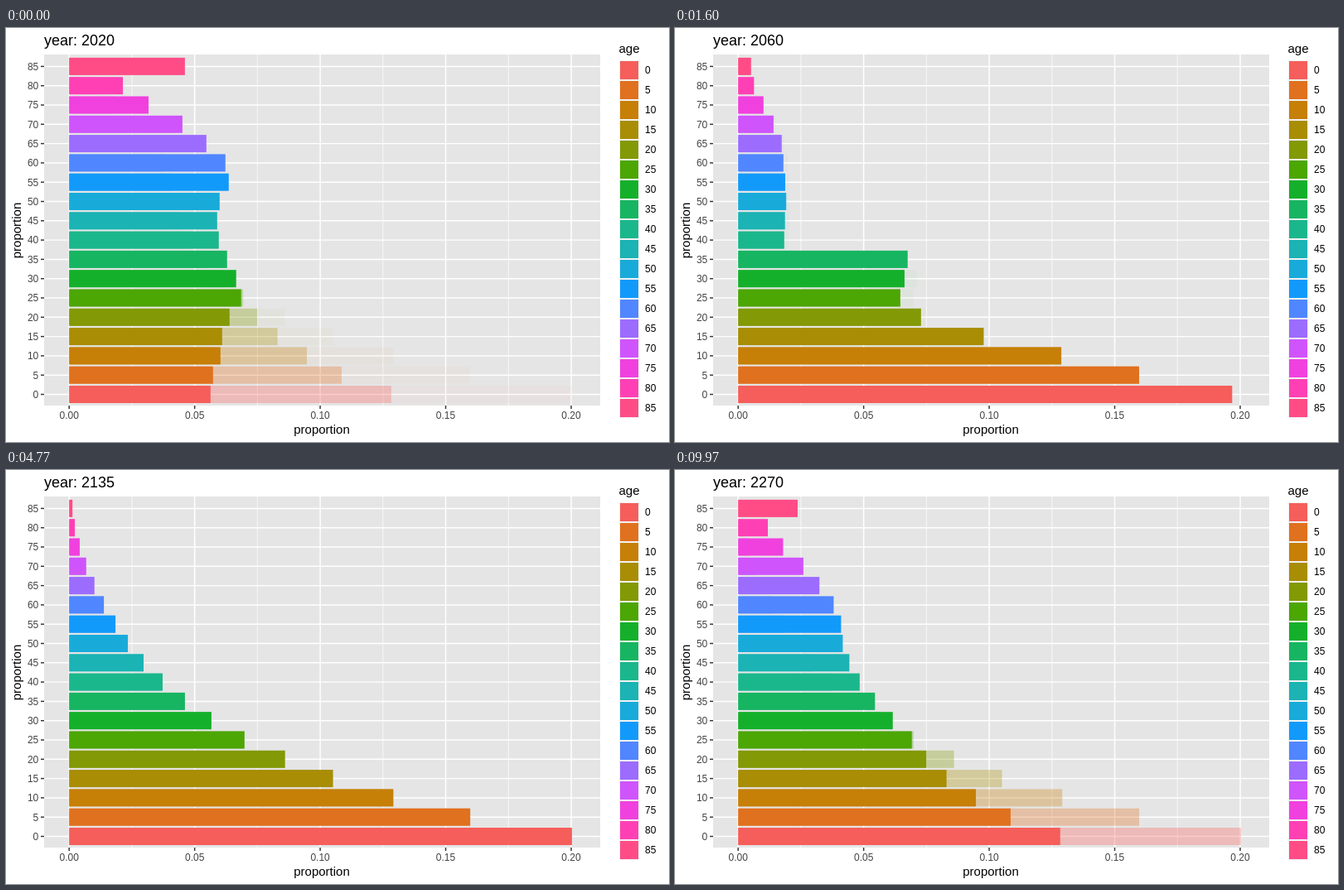
An HTML page for the animation above (10 s loop, 800 px wide and 500 px high).

```html
<!DOCTYPE html>
<html lang="en">
<head>
<meta charset="utf-8">
<title>Population by age</title>
<style>
  html, body { margin: 0; width: 100%; height: 100%; overflow: hidden; background: #fff; }
  svg { display: block; width: 800px; height: 500px; }
  text { font-family: "Liberation Sans", Arial, sans-serif; }
</style>
</head>
<body>
<svg id="stage" viewBox="0 0 800 500" width="800" height="500"></svg>
<script>
const FPS = 30, FRAMES = 300, LOOP = 10000, LAST_STATE = 50, GROUPS = 18;
const COLORS = ('#F55E5A #E0711E #C67F07 #A88D05 #839905 #4CA604 #15B02B #17B561 #1BB78C ' +
  '#1BB3B4 #18ABDA #129AFB #5086FF #9C6CFF #CF54FC #F041DE #FF40B4 #FF4C87').split(' ');
const LEFT = 76.2, UNIT = 3029;          // x of zero, pixels per 1.0
const BAR_HEIGHT = 21, WAKE = [1, 8 / 27, 1 / 27];
const rowY = i => 442.5 - 23.3 * i;

// --- population model: cohorts age step by step, scaled by long-run growth ---
const FIRST = [171, 174, 183, 185, 194, 208, 202, 191, 181, 179, 182, 193, 189, 166, 137, 96, 65, 140];
const STABLE = [608, 485, 392, 319, 261, 212, 172, 140, 113, 90, 71, 56, 42, 30.6, 20.8, 12.8, 6.8];
const BIRTHS = [508, 406, 321, 294, 323, 346, 347, 341, 336, 333, 336];
const STEADY_BIRTHS = 337, OLD_ENTRY = 0.4, OLD_STAY = 0.3;

function nextPopulation(pop, step) {
  const next = [BIRTHS[step] ?? STEADY_BIRTHS];
  for (let i = 1; i < GROUPS - 1; i++) next[i] = pop[i - 1] * STABLE[i] / STABLE[i - 1];
  next.push(pop[GROUPS - 2] * OLD_ENTRY + pop[GROUPS - 1] * OLD_STAY);
  return next;
}
function shares(pop) {
  const total = pop.reduce((a, b) => a + b);
  return pop.map(v => v / total);
}
const states = [];
for (let k = 0, pop = FIRST; k <= LAST_STATE; k++) {
  states.push(shares(pop));
  pop = nextPopulation(pop, k);
}

// --- timing, in frames ---
const moveStart = k => Math.min(6 * k + 3, 4 * k + 99);
const titleStart = k => k < 24 ? 6 * k : moveStart(k);
function latest(start, frame) {
  let k = LAST_STATE;
  while (k >= 0 && start(k) > frame) k--;
  return k;
}
function pose(frame) {
  const k = latest(moveStart, frame);
  if (k < 0) return states[0];
  const p = Math.min(1, (frame - moveStart(k) + 1) / (k < 48 ? 3 : 2));
  const to = states[(k + 1) % states.length];
  return states[k].map((v, i) => v + (to[i] - v) * p);
}

// --- drawing ---
const stage = document.getElementById('stage');
function add(tag, attrs, content) {
  const el = document.createElementNS('http://www.w3.org/2000/svg', tag);
  for (const name in attrs) el.setAttribute(name, attrs[name]);
  if (content !== undefined) el.textContent = content;
  return stage.appendChild(el);
}
const rect = (x, y, width, height, fill) => add('rect', { x, y, width, height, fill });
const line = (x1, y1, x2, y2, stroke, w) =>
  add('line', { x1, y1, x2, y2, stroke, 'stroke-width': w });
const label = (x, y, size, fill, content, anchor = 'start') =>
  add('text', { x, y, 'font-size': size, fill, 'text-anchor': anchor }, content);

rect(0, 0, 800, 500, '#fff');
rect(46, 32, 671, 424, '#E5E5E5');
for (let i = 0; i < 4; i++) {
  const x = LEFT + UNIT * (0.025 + 0.05 * i);
  line(x, 32, x, 456, '#fff', 0.75);
}
for (let i = 0; i < GROUPS; i++) {
  const y = rowY(i);
  line(46, y, 717, y, '#fff', 1.45);
  line(42, y, 46, y, '#333', 1.45);
  label(39.3, y + 4.3, 12, '#444', 5 * i, 'end');
}
for (let i = 0; i < 5; i++) {
  const x = LEFT + UNIT * 0.05 * i;
  line(x, 32, x, 456, '#fff', 1.45);
  line(x, 456, x, 460, '#333', 1.45);
  label(x, 472, 12, '#444', (0.05 * i).toFixed(2), 'middle');
}

// oldest ghosts first, solid bars on top
const layers = [2, 1, 0].map(age => ({
  age,
  bars: COLORS.map((color, i) => {
    const bar = rect(LEFT, rowY(i) - BAR_HEIGHT / 2, 0, BAR_HEIGHT, color);
    bar.setAttribute('fill-opacity', WAKE[age]);
    return bar;
  })
}));

const title = label(46, 21, 18, '#000', '');
label(381, 490, 15, '#000', 'proportion', 'middle');
label(0, 0, 15, '#000', 'proportion', 'middle')
  .setAttribute('transform', 'translate(18.3 244.5) rotate(-90)');

label(739.5, 30, 15, '#000', 'age');
rect(740, 39, 24, 432, '#F2F2F2');
COLORS.forEach((color, i) => {
  const y = 39 + 24 * i;
  rect(741, y + 1, 22, 22, color);
  label(771, y + 16.4, 12, '#000', 5 * i);
});

function draw(time) {
  const frame = Math.min(FRAMES - 1, Math.floor((time % LOOP + 4) * FPS / 1000));
  title.textContent = 'year: ' + (2020 + 5 * latest(titleStart, frame));
  for (const { age, bars } of layers) {
    const values = pose((frame - age + FRAMES) % FRAMES);
    bars.forEach((bar, i) => bar.setAttribute('width', (values[i] * UNIT).toFixed(2)));
  }
}

const began = performance.now();
function tick() {
  draw(performance.now() - began);
  requestAnimationFrame(tick);
}
tick();
</script>
</body>
</html>
```
